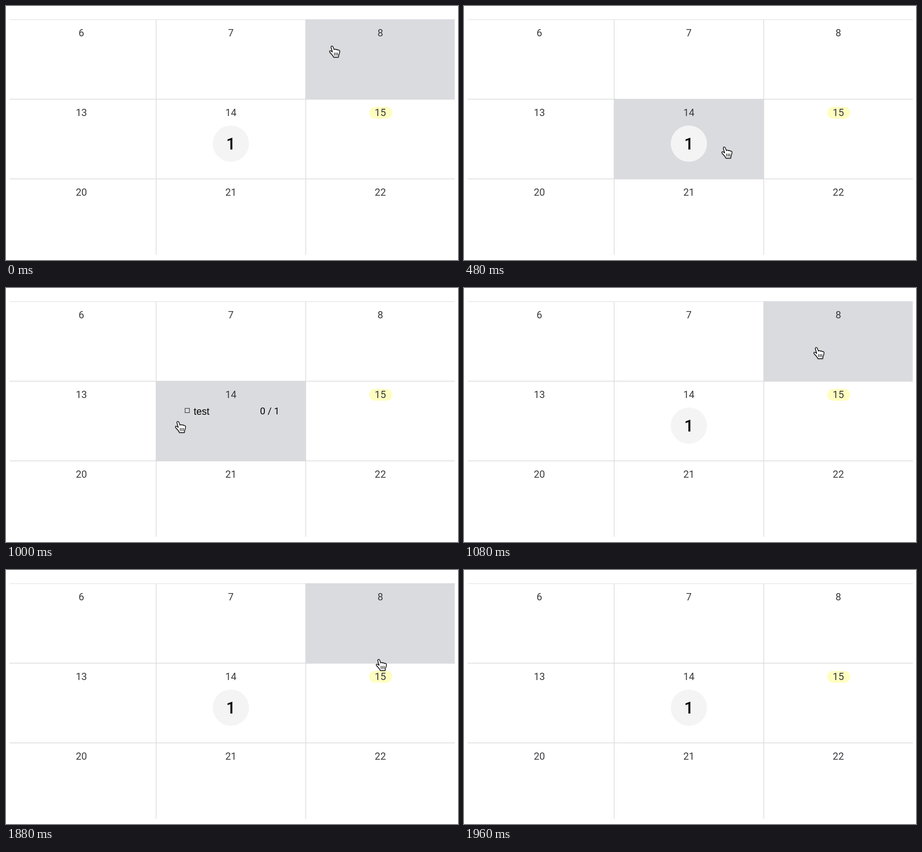
These frames come from a looping animation (997x561 px, 2520 ms). An HTML page with a canvas:

```html
<!DOCTYPE html>
<html lang="en">
<head>
<meta charset="utf-8">
<title>Calendar hover</title>
<style>
  html, body { margin: 0; width: 100%; height: 100%; overflow: hidden; background: #fff; }
  canvas { display: block; width: 997px; height: 561px; }
</style>
</head>
<body>
<canvas id="stage" width="997" height="561"></canvas>
<script>
const ctx = document.getElementById('stage').getContext('2d');
const LOOP = 2520, STEP = 40;
const LEFT = 8, RIGHT = 990, TOP = 30, BOTTOM = 549.5;
const CELL_W = 330, CELL_H = 176;
const LINE = '#dcdcde', HOVER = '#dadbdf';
const DIGITS = 'Roboto, Arial, sans-serif';
const WORDS = '"Liberation Sans", Arial, sans-serif';

const linear = k => k;
const easeOut = k => 1 - (1 - k) ** 2;

const home = { x: 712, y: 87 };
const moves = [
  { from: 0, to: 80, x: 735, y: 84 },
  { from: 240, to: 320, x: 702, y: 146 },
  { from: 320, to: 480, x: 567, y: 310 },
  { from: 480, to: 760, x: 502, y: 308, ease: easeOut },
  { from: 880, to: 960, x: 173, y: 375 },
  { from: 960, to: 1080, x: 770, y: 130 },
  { from: 1480, to: 1560, x: 775, y: 141 },
  { from: 1800, to: 1880, x: 815, y: 196 },
  { from: 1880, to: 1920, x: 832, y: 376 }
];
const hovers = [
  { at: 0, col: 2, row: 0 },
  { at: 400, col: 1, row: 1 },
  { at: 1040, col: 2, row: 0 },
  { at: 1920, col: 2, row: 1 }
];
const LIST_START = 600, LIST_END = 1040, POINTER_END = 1960;

const hand = new Path2D(
  'M5 4 C4.5 1.3 8.3 .4 9.4 3.4 L11.8 9.6 C12.8 7.7 15.3 8 16 9.7 ' +
  'C17 8.4 19.4 8.8 20 10.7 C21.5 9.7 24 10.5 24.1 12.6 ' +
  'C24.3 16 23 18.3 21.8 21.5 L21.4 26 L10.6 26 C10 23 7.4 21 5 18 ' +
  'C3.2 15.9 1 14.5 1.5 13 C2.3 11 5.3 12 8 14.6 Z');

function pointerAt(t) {
  let { x, y } = home;
  for (const m of moves) {
    if (t <= m.from) break;
    const k = (m.ease || linear)(Math.min(1, (t - m.from) / (m.to - m.from)));
    x += (m.x - x) * k;
    y += (m.y - y) * k;
  }
  return { x, y };
}

function text(str, x, y, font, color = '#000', align = 'center') {
  ctx.font = font;
  ctx.textAlign = align;
  ctx.fillStyle = color;
  ctx.fillText(str, x, y);
}

function rect(x, y, w, h, color) {
  ctx.fillStyle = color;
  ctx.fillRect(x, y, w, h);
}

function pill(x, y, w, h, color) {
  ctx.fillStyle = color;
  ctx.beginPath();
  ctx.roundRect(x, y, w, h, h / 2);
  ctx.fill();
}

function drawGrid() {
  rect(LEFT, TOP - 0.5, RIGHT - LEFT, 1.2, '#e2e2e4');
  for (let i = 1; i < 3; i++) {
    rect(LEFT, TOP - 1 + i * CELL_H, RIGHT - LEFT, 1.6, LINE);
    rect(0.4 + i * CELL_W, TOP, 1.6, BOTTOM - TOP, LINE);
  }
}

function drawHover(t) {
  const { col, row } = hovers.filter(h => h.at <= t).pop();
  const x = 0.5 + col * CELL_W, y = TOP - 0.6 + row * CELL_H;
  rect(x, y, Math.min(x + CELL_W + 1, RIGHT - 0.3) - x, CELL_H + 1.2, HOVER);
}

function drawDays() {
  pill(801, 222.7, 51, 26.2, '#fefec0');
  for (let row = 0; row < 3; row++)
    for (let col = 0; col < 3; col++)
      text(6 + row * 7 + col, 166.3 + col * 329.7, 66.7 + row * CELL_H, '22px ' + DIGITS, '#3a3b3e');
}

function drawCount() {
  pill(456, 264, 80, 80, '#f4f4f4');
  text('1', 496, 316.5, '500 36px ' + DIGITS);
}

function drawList() {
  ctx.strokeStyle = '#222';
  ctx.lineWidth = 1.1;
  ctx.strokeRect(395, 265.8, 9.6, 9.6);
  text('test', 414, 280, '21.5px ' + WORDS, '#000', 'left');
  text('0 / 1', 560.3, 279, '21px ' + DIGITS, '#000', 'left');
}

function drawPointer({ x, y }) {
  ctx.save();
  ctx.translate(x, y);
  ctx.lineJoin = ctx.lineCap = 'round';
  ctx.save();
  ctx.shadowColor = 'rgba(0,0,0,.4)';
  ctx.shadowBlur = 2.5;
  ctx.shadowOffsetY = 1.2;
  ctx.fillStyle = '#fff';
  ctx.fill(hand);
  ctx.restore();
  ctx.strokeStyle = '#000';
  ctx.lineWidth = 1.5;
  ctx.stroke(hand);
  ctx.lineWidth = 1.3;
  ctx.beginPath();
  for (let i = 0; i < 3; i++) {
    ctx.moveTo(12.4 + i * 3.4, 16.3);
    ctx.lineTo(12.4 + i * 3.4, 22);
  }
  ctx.stroke();
  ctx.restore();
}

function render(now) {
  const t = Math.floor((now % LOOP) / STEP) * STEP;
  const active = t < POINTER_END;
  rect(0, 0, 997, 561, '#fff');
  drawGrid();
  if (active) drawHover(t);
  drawDays();
  if (t >= LIST_START && t < LIST_END) drawList();
  else drawCount();
  if (active) drawPointer(pointerAt(t));
}

const start = performance.now();
function tick() {
  render(performance.now() - start);
  requestAnimationFrame(tick);
}
tick();
</script>
</body>
</html>
```
